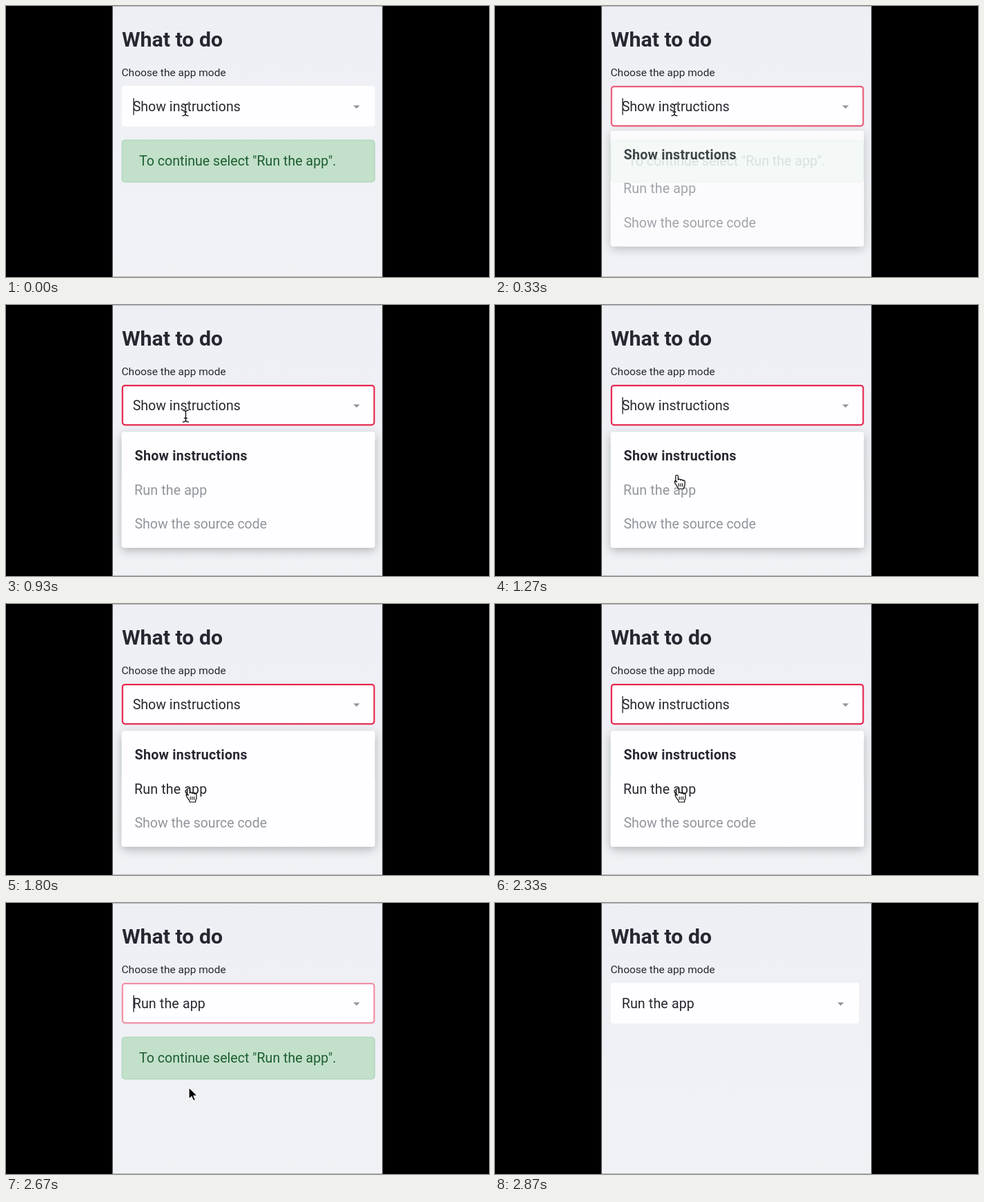
These frames come from a looping animation (700x394 px, 2.99 s). An HTML page:

```html
<!DOCTYPE html>
<html lang="en">
<head>
<meta charset="utf-8">
<title>App mode select</title>
<style>
  html, body { margin: 0; width: 100%; height: 100%; overflow: hidden; background: #000; }
  svg { display: block; width: 100%; height: 100%; }
  text { font-family: Roboto, "Noto Sans", sans-serif; font-size: 19.6px; fill: #262730; }
  .bold { font-weight: 700; letter-spacing: .28px; }
  .run { letter-spacing: .15px; }
  .hand { fill: #fff; stroke: #000; stroke-width: 1.2; stroke-linejoin: round; stroke-linecap: round; }
  .beam { fill: none; stroke-linecap: round; }
</style>
</head>
<body>
<svg viewBox="0 0 700 394" xmlns="http://www.w3.org/2000/svg">
  <defs>
    <linearGradient id="page" x2="0" y2="1">
      <stop offset="0" stop-color="#eeeff4"/>
      <stop offset="1" stop-color="#f0f2f6"/>
    </linearGradient>
    <filter id="shadow" x="-20%" y="-20%" width="140%" height="150%">
      <feDropShadow dx="0" dy="4" stdDeviation="7" flood-color="#000" flood-opacity=".26"/>
    </filter>
    <path id="beamPath" d="M-4-8.5Q0-8.5 0-5.5Q0-8.5 4-8.5M0-5.5V5.5M-4 8.5Q0 8.5 0 5.5Q0 8.5 4 8.5M-2 3H2"/>
  </defs>
  <rect width="700" height="394"/>
  <rect x="154.5" width="391" height="394" fill="url(#page)"/>
  <path d="M154.5 .5H545.5M154.5 393.5H545.5" stroke="#b4b5b9" stroke-width="1"/>

  <text x="168" y="59.3" style="font-size:30.3px;font-weight:700">What to do</text>
  <text x="167.5" y="101.7" style="font-size:15.5px">Choose the app mode</text>

  <rect id="box" x="167.7" y="116" height="59.3" rx="4" fill="#fefdff"/>
  <rect id="ring" x="168.8" y="117.1" width="364.8" height="57.2" rx="3.5" fill="none" stroke="#e6284f" stroke-width="2.2"/>
  <text id="value" x="183.7" y="152.6"></text>
  <path id="caret" d="M185 134V158.5" stroke="#1d1d24" stroke-width="1.3"/>
  <path id="chevron" d="M-4.7-2H4.7L0 2.8Z" fill="#90959d"/>

  <g id="alert">
    <rect x="168.2" y="195.2" width="366" height="60.6" rx="4" fill="#c3e0cb" stroke="#a9d5b5" stroke-width="1.3"/>
    <text x="193" y="232.2" style="fill:#1c5e2f">To continue select "Run the app".</text>
  </g>

  <g id="menu">
    <rect x="167.7" y="184.6" width="367" height="168.4" rx="4" fill="#fefdff" filter="url(#shadow)"/>
    <text class="bold" x="186.6" y="226">Show instructions</text>
    <text id="option" class="run" x="186.1" y="275.8">Run the app</text>
    <text x="186.5" y="325.3" style="fill:#91959d;letter-spacing:-.05px">Show the source code</text>
  </g>

  <g id="beam" class="beam">
    <use href="#beamPath" stroke="#fff" stroke-opacity=".7" stroke-width="3"/>
    <use href="#beamPath" stroke="#15151a" stroke-width="1.4"/>
  </g>
  <path id="arrow" d="M0 0V17.2L4 13.5L6.5 19.5L9.5 18.2L7 12.4H12.4Z" stroke="#fff" stroke-width="1.2" stroke-linejoin="round"/>
  <g id="hand" class="hand">
    <path d="M-2.3 9.5V1.8a1.8 1.8 0 0 1 3.6 0V7q.3-1.1 1.8-1.1 1.5 0 1.7 1.5 .4-.9 1.7-.8 1.4.1 1.6 1.7 .4-.7 1.4-.6 1.6.2 1.6 2.2v3.4q0 2-1.2 3.8l-.4 2.9h-8.2l-.4-2.2q-2.6-3-4.2-6.3 -1.2-2.3.1-3 1.3-.6 2.7 1.4z"/>
    <path d="M2.2 12.3V16.3M4.9 12.3V16.3M7.6 12.3V16.3" stroke-width="1.1"/>
  </g>
</svg>
<script>
const LOOP = 2990, STEP = 1000 / 15;
const PICK = 2590, DONE = 2860;
const $ = id => document.getElementById(id);
const set = (id, attrs) => {
  for (const key in attrs) $(id).setAttribute(key, attrs[key]);
};
const show = (id, on) => set(id, { visibility: on ? "visible" : "hidden" });
const span = (t, a, b) => Math.min(1, Math.max(0, (t - a) / (b - a)));
const mix = (a, b, k) => a + (b - a) * k;
const easeOut = (x, power) => 1 - (1 - x) ** power;
const smooth = x => x * x * (3 - 2 * x);

function drawPointer(t, open) {
  const k = smooth(span(t, 780, 1420)) ** 1.25;
  const x = mix(260, 265, k), y = mix(151, 268, k);
  const kind = t >= DONE ? "" : y < 176 ? "beam" : open && y > 184 ? "hand" : "arrow";
  for (const id of ["beam", "hand", "arrow"]) {
    show(id, id === kind);
    set(id, { transform: `translate(${x} ${y})` });
  }
}

function draw(t) {
  const open = t < PICK, done = t >= DONE;
  const ring = open ? easeOut(span(t, 65, 600), 2) : 1 - span(t, 2550, 2790);
  set("ring", { opacity: ring });

  const menu = open ? easeOut(span(t, 150, 560), 3) : 0;
  set("menu", { opacity: menu, transform: `translate(0 ${-20 * (1 - menu)})` });

  const hover = span(t, 1270, 1470);
  const rgb = [mix(145, 38, hover), mix(149, 39, hover), mix(157, 48, hover)].map(Math.round);
  $("option").style.fill = `rgb(${rgb})`;

  $("value").textContent = open ? "Show instructions" : "Run the app";
  $("value").setAttribute("class", open ? "" : "run");
  show("caret", t < 795 || (t > 1260 && t < 1795) || (t > 2325 && t < 2795));

  show("alert", !done);
  set("box", { width: done ? 359.8 : 367 });
  set("chevron", { transform: `translate(${done ? 501 : 508} 146.5)` });
  drawPointer(t, open);
}

function tick(now) {
  const t = now % LOOP;
  draw(Math.floor((t + 5) / STEP) * STEP);
  requestAnimationFrame(tick);
}
draw(0);
requestAnimationFrame(tick);
</script>
</body>
</html>
```
